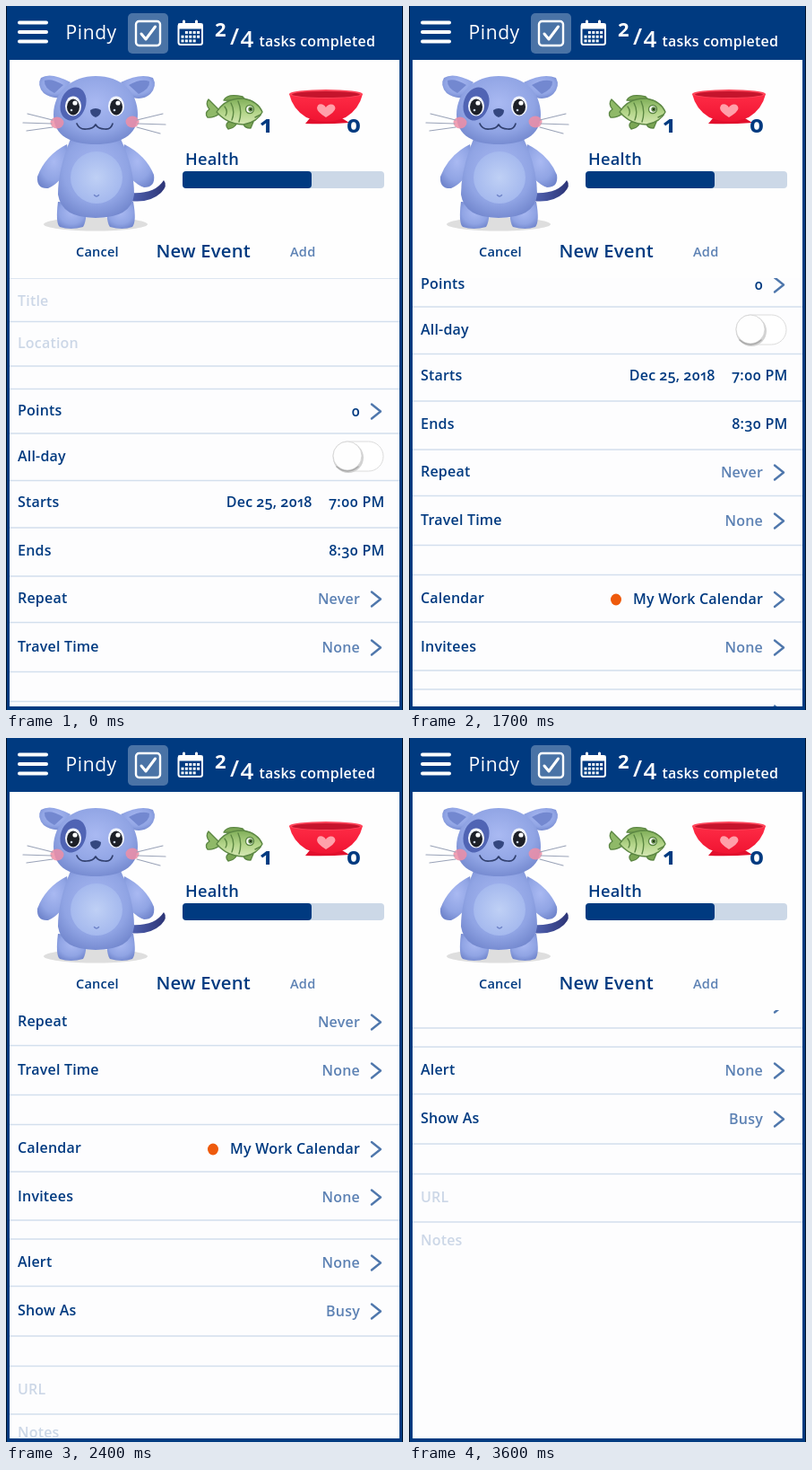
These frames come from a looping animation (443 by 784 pixels, 4800 ms). An HTML page:

```html
<!DOCTYPE html>
<html lang="en">
<head>
<meta charset="utf-8">
<title>New Event</title>
<style>
  html, body { margin: 0; width: 100%; height: 100%; overflow: hidden; background: #fff; }
  svg { display: block; width: 443px; height: 784px; }
  text {
    font: 600 16px "Open Sans", "Noto Sans", sans-serif;
    font-variant-numeric: oldstyle-nums;
    letter-spacing: .2px;
    fill: #003a80;
  }
  .end { text-anchor: end; }
  .mid { text-anchor: middle; }
  .soft { fill: #5d82b4; }
  .hint { fill: #ccd7e7; }
  .head text { fill: #fff; }
  .lining { font-variant-numeric: lining-nums; }
  .count { font-size: 27px; font-weight: 700; }
  .small { font-size: 14.6px; }
  .line { fill: none; stroke-linecap: round; stroke-linejoin: round; }
</style>
</head>
<body>
<svg viewBox="0 0 443 784">
  <defs>
    <clipPath id="view"><rect x="4" y="60" width="435" height="720"/></clipPath>
    <radialGradient id="fur" cx=".5" cy=".4" r=".65">
      <stop offset="0" stop-color="#a9b9f2"/>
      <stop offset=".65" stop-color="#90a4e4"/>
      <stop offset="1" stop-color="#7186cd"/>
    </radialGradient>
    <radialGradient id="belly">
      <stop offset="0" stop-color="#bfd0f5"/>
      <stop offset="1" stop-color="#a5b9ee"/>
    </radialGradient>
    <linearGradient id="tail">
      <stop offset="0" stop-color="#5365b4"/>
      <stop offset="1" stop-color="#2c3476"/>
    </linearGradient>
    <linearGradient id="scales" x2="0" y2="1">
      <stop offset="0" stop-color="#7fae58"/>
      <stop offset=".55" stop-color="#b5d68b"/>
      <stop offset="1" stop-color="#d6e8b4"/>
    </linearGradient>
    <linearGradient id="glaze" x2="0" y2="1">
      <stop offset="0" stop-color="#ff2c46"/>
      <stop offset="1" stop-color="#f01432"/>
    </linearGradient>
  </defs>

  <rect width="443" height="784" fill="#fdfdfe"/>
  <g clip-path="url(#view)"><g id="list"></g></g>

  <rect x="4" y="61.5" width="435" height="241.5" fill="#fefefe"/>

  <g id="cat">
    <ellipse cx="100" cy="243" rx="58" ry="7.5" fill="#dedede"/>
    <path d="M138 208Q166 210 176 194Q181 200 173 208Q160 220 138 217Z" fill="url(#tail)"/>
    <g fill="url(#fur)">
      <path d="M58 218Q55 242 60 246Q72 250 86 246Q90 240 90 220Z"/>
      <path d="M112 220Q112 241 116 246Q130 250 141 246Q146 240 142 218Z"/>
      <path d="M68 154Q44 166 35 190Q34 204 47 203Q60 198 72 176Z"/>
      <path d="M132 154Q156 166 165 188Q167 202 154 202Q141 198 128 176Z"/>
      <path d="M72 148Q58 182 58 210Q62 236 100 236Q140 236 143 210Q143 180 128 148Z"/>
    </g>
    <ellipse cx="101" cy="191" rx="29" ry="29" fill="url(#belly)"/>
    <path class="line" d="M98.500 210.500Q101 213.500 103.500 210.500" stroke="#6f84c8" stroke-width="1.500"/>
    <g fill="url(#fur)">
      <path d="M72 85Q50 73 39 80Q34 88 42 97Q50 103 59 102Z"/>
      <path d="M128 85Q150 74 164 80Q169 89 161 98Q153 105 142 102Z"/>
    </g>
    <path d="M64 88Q51 80 43 83Q42 91 54 97Z" fill="#7388d0"/>
    <path d="M137 88Q151 80 160 84Q161 92 148 98Z" fill="#7388d0"/>
    <path d="M100 78C128 78 147 95 147 121C147 145 126 154 100 154C73 154 53 145 53 121C53 95 74 78 100 78Z" fill="url(#fur)"/>
    <ellipse cx="75" cy="109" rx="14" ry="19" transform="rotate(18 75 109)" fill="#5064b4"/>
    <g id="eyes"></g>
    <path d="M94 116Q100 112 106 116Q106 122 100 124Q94 122 94 116Z" fill="#34477f"/>
    <path class="line" d="M79 131Q82 138 90 137Q97 137 100 132Q103 137 110 137Q117 138 119 131" stroke="#31406f" stroke-width="1.700"/>
    <ellipse cx="57" cy="130" rx="7.500" ry="6.500" fill="#ee8ea6" opacity=".85"/>
    <ellipse cx="141" cy="129" rx="7.500" ry="6.500" fill="#ee8ea6" opacity=".85"/>
    <path class="line" d="M52 127L24 120M51 131L19 130M52 135L23 139M146 127L175 120M147 131L178 132M146 135L172 142" stroke="#9aa3b8" stroke-width="1.200"/>
  </g>

  <g id="fish" stroke="#5c8743" stroke-width="1.400" stroke-linejoin="round">
    <path d="M238 116L226 104Q222 109 227 115Q221 119 225 124Q231 125 238 120Z" fill="#8fb968"/>
    <path d="M243 105Q247 97 264 101L268 106ZM248 129Q244 133 248 137Q255 136 258 130ZM265 131Q266 136 273 136L276 129Z" fill="#7ba654"/>
    <path d="M235 118Q245 102 265 103Q281 106 286 118Q281 129 265 132Q247 132 235 118Z" fill="url(#scales)"/>
    <path class="line" d="M244 112Q248 117 245 122M251 108Q256 117 252 127M259 106Q264 117 260 129M278 124L284 121"/>
    <circle cx="272" cy="115" r="4.500" fill="#fff"/>
    <circle cx="273" cy="115" r="2" fill="#26391d"/>
  </g>

  <g id="bowl">
    <path d="M339 125L334 131Q358 132 383 130L375 125Z" fill="#e20f2d"/>
    <path d="M316 98Q320 115 335 124Q357 133 379 124Q394 115 398 98Z" fill="url(#glaze)"/>
    <ellipse cx="357" cy="98" rx="41" ry="5" fill="#ff455a"/>
    <ellipse cx="357" cy="98.500" rx="38" ry="3.500" fill="#c5142c"/>
    <path d="M357 124Q347 118 347 113.500Q348 108 353 109.500Q356 110.500 357 113Q358 110.500 362 109.500Q367 109 367.500 114Q367 118 357 124Z" fill="#ffa0aa"/>
  </g>

  <text class="count mid" x="290" y="141">1</text>
  <text class="count mid" x="388" y="141">0</text>
  <text x="200" y="177" style="font-size:18.300px">Health</text>
  <rect x="197" y="184" width="225" height="19" rx="4" fill="#ccd8e7"/>
  <rect x="197" y="184" width="144" height="19" rx="4" fill="#003a80"/>
  <text class="small" x="78" y="279">Cancel</text>
  <text x="167.500" y="279.500" style="font-size:20.300px">New Event</text>
  <text class="small soft" x="317" y="279">Add</text>

  <g class="head">
    <rect width="443" height="60" fill="#003a80"/>
    <path class="line" d="M15 18.500H45M15 29H45M15 39.500H45" stroke="#fff" stroke-width="4"/>
    <text x="66.500" y="36.500" style="font-size:21px;font-weight:500;letter-spacing:.6px">Pindy</text>
    <rect x="136" y="8" width="45" height="45" rx="5" fill="#4a73a6"/>
    <rect x="145" y="17" width="27" height="27" rx="3.500" fill="none" stroke="#fff" stroke-width="2.400"/>
    <path class="line" d="M151 31L156 37L166.500 23" stroke="#fff" stroke-width="3"/>
    <g id="calendar" fill="#fff"></g>
    <text class="lining" x="233" y="34" style="font-size:22px;font-weight:700">2</text>
    <text x="250" y="43" style="font-size:26px">/</text>
    <text class="lining" x="261.500" y="46" style="font-size:26px">4</text>
    <text x="282.500" y="45">tasks completed</text>
  </g>

  <path d="M0 60H4V780H439V60H443V784H0Z" fill="#003a80"/>
  <path d="M.5 0V784M442.500 0V784" stroke="#00122c"/>
</svg>
<script>
const $ = id => document.getElementById(id);
const text = (x, y, label, cls = '') => `<text x="${x}" y="${y}" class="${cls}">${label}</text>`;
const chevron = y => `<path class="line" d="M408 ${y - 8}L418 ${y}L408 ${y + 8}" stroke="#4f77ac" stroke-width="2.4"/>`;

const rules = [303, 351.5, 401, 426.5, 476, 528.5, 581, 635, 686.5, 741.5, 774.5,
  827, 881, 902, 954.5, 1010, 1043.5, 1097];

// label, centre, value, value style
const rows = [
  ['Points', 450, '0', ''],
  ['All-day', 501],
  ['Starts', 552],
  ['Ends', 606],
  ['Repeat', 659, 'Never', 'soft'],
  ['Travel Time', 713, 'None', 'soft'],
  ['Calendar', 800.5, 'My Work Calendar', ''],
  ['Invitees', 854, 'None', 'soft'],
  ['Alert', 927, 'None', 'soft'],
  ['Show As', 981, 'Busy', 'soft']
];
const hints = [['Title', 328], ['Location', 375], ['URL', 1069], ['Notes', 1117]];

const toggle = `
  <rect x="365" y="485" width="56" height="33" rx="16.5" fill="#fff" stroke="#dcdcdc"/>
  <circle cx="382" cy="503" r="17" fill="#d2d2d2"/>
  <circle cx="381" cy="501" r="16" fill="#fefefe" stroke="#d0d0d0" stroke-width=".8"/>
  <path class="line" d="M369 513Q381 523 393 513" stroke="#a8a8a8" stroke-width="1.5"/>`;

$('list').innerHTML =
  rules.map(y => `<path d="M4 ${y}H439" stroke="#d3dfed" stroke-width="1.6"/>`).join('') +
  hints.map(([label, y]) => text(13, y + 6, label, 'hint')).join('') +
  rows.map(([label, y, value, cls]) => text(13, y + 5.5, label) +
    (value ? text(395, y + 6.5, value, 'end ' + cls) + chevron(y + 1.5) : '')).join('') +
  text(341.5, 558, 'Dec 25, 2018', 'end') +
  text(422.5, 558, '7:00 PM', 'end') +
  text(422.5, 612, '8:30 PM', 'end') +
  '<ellipse cx="231" cy="802" rx="6" ry="6.5" fill="#ee5a0c"/>' + toggle;

$('eyes').innerHTML = [75, 123].map(x => `
  <ellipse cx="${x}" cy="111.500" rx="9" ry="11" fill="#f2f5fd"/>
  <ellipse cx="${x}" cy="112.500" rx="7" ry="9" fill="#1d2028"/>
  <circle cx="${x + 2}" cy="108" r="2.600" fill="#fff"/>
  <circle cx="${x - 2}" cy="116" r="1.300" fill="#c8d2e8"/>`).join('');

let cal = '<rect x="192.500" y="20" width="26.500" height="23" rx="2.500" fill="none" stroke="#fff" stroke-width="2"/>' +
  '<rect x="192" y="19.500" width="27.500" height="6"/>' +
  '<rect x="197" y="15.500" width="3" height="6" rx="1.500"/><rect x="211" y="15.500" width="3" height="6" rx="1.500"/>';
for (let i = 0; i < 15; i++) {
  if (i === 0 || i === 14) continue;
  cal += `<rect x="${195.5 + i % 5 * 4.4}" y="${28 + Math.floor(i / 5) * 4.7}" width="3" height="3"/>`;
}
$('calendar').innerHTML = cal;

// time in ms, scroll in px, speed in px per 100 ms
const path = [
  [1100, 0, 5], [1400, 49, 24], [1900, 207, 30], [2200, 289, 26],
  [2600, 394, 22], [2800, 435, 24], [3200, 558, 14]
];
const loop = 4800, tick = 100;

function scrollAt(t) {
  if (t <= path[0][0]) return 0;
  const i = path.findIndex(p => t < p[0]);
  if (i < 0) return path[path.length - 1][1];
  const [t0, y0, v0] = path[i - 1], [t1, y1, v1] = path[i];
  const d = (t1 - t0) / 100, u = (t - t0) / (t1 - t0), w = 1 - u;
  return w * w * (1 + 2 * u) * y0 + u * u * (3 - 2 * u) * y1 + d * u * w * (w * v0 - u * v1);
}

const start = performance.now();
function draw() {
  const t = (performance.now() - start) % loop;
  const y = Math.round(scrollAt(Math.floor(t / tick) * tick));
  $('list').setAttribute('transform', `translate(0 ${-y})`);
  requestAnimationFrame(draw);
}
draw();
</script>
</body>
</html>
```
